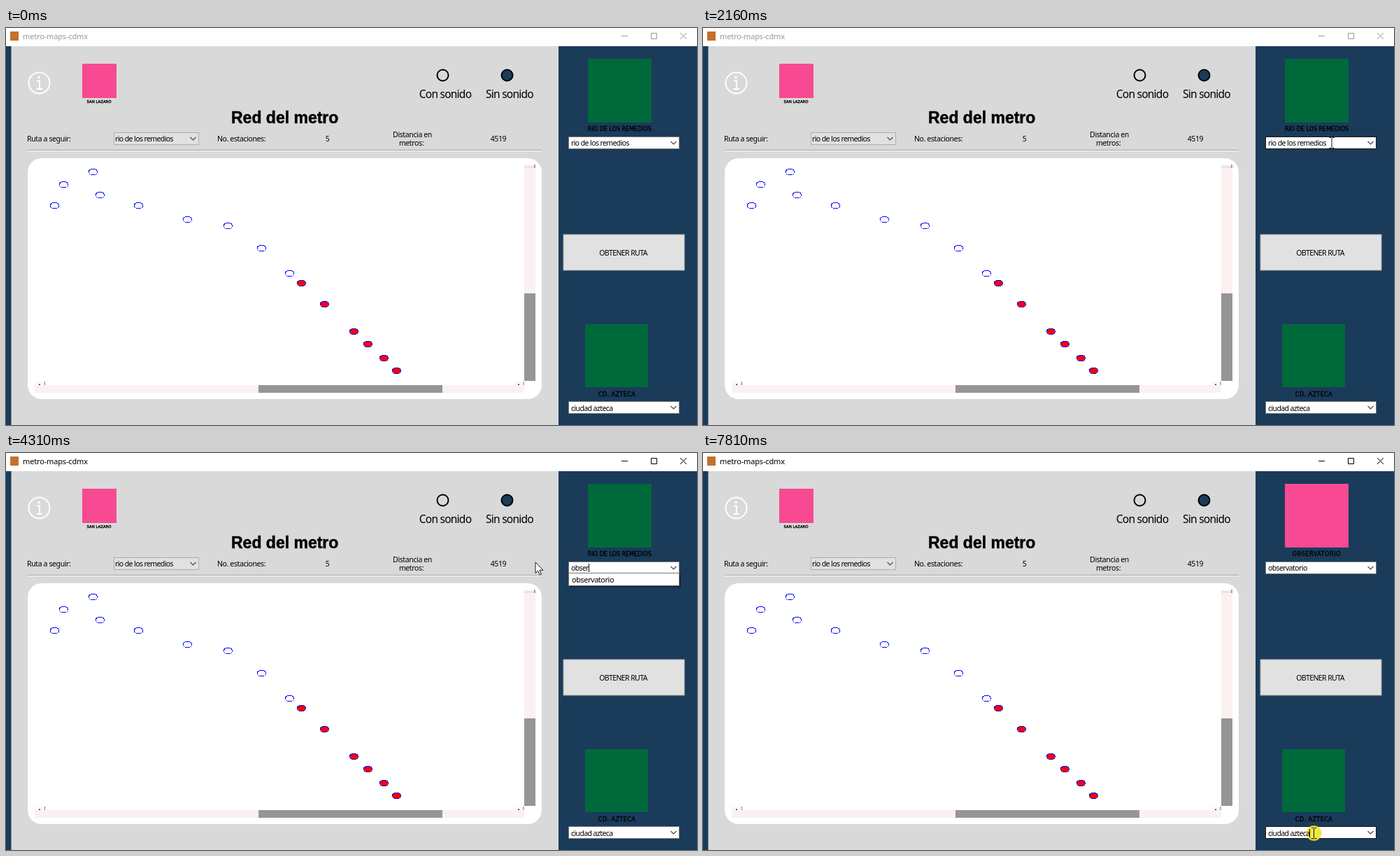
Recreate the animation shown at these times as an HTML page. Size 988 by 567 pixels, loop 8000 ms.

```html
<!DOCTYPE html>
<html lang="es">
<head>
<meta charset="utf-8">
<title>metro-maps-cdmx</title>
<style>
html, body { margin: 0; width: 100%; height: 100%; overflow: hidden; background: #fff; }
svg { display: block; width: 988px; height: 567px; }
text { font-family: "Noto Sans", sans-serif; white-space: pre; }
.label { font-size: 10.5px; letter-spacing: -.38px; }
.field { font-size: 10.5px; letter-spacing: -.6px; }
.item { font-size: 11px; letter-spacing: -.48px; }
.radio { font-size: 15.5px; letter-spacing: -.75px; }
.sign { font: 8px "DejaVu Sans", sans-serif; stroke: #000; stroke-width: .3px; text-anchor: middle; }
.title { font: bold 23px "Liberation Sans", Arial, sans-serif; stroke: #000; stroke-width: .5px; }
.mid { text-anchor: middle; }
</style>
</head>
<body>
<svg id="stage" viewBox="0 0 988 567"></svg>
<script>
const LOOP = 8000, BLUE = '#1a3b59', GRAY = '#d9d9d9', GREEN = '#00693c', PINK = '#f74a92';
const stage = document.getElementById('stage');

const rect = (x, y, w, h, fill, more = '') =>
  `<rect x="${x}" y="${y}" width="${w}" height="${h}" fill="${fill}" ${more}/>`;
const box = (x, y, w, h, fill, line, more = '') =>
  rect(x + .5, y + .5, w - 1, h - 1, fill, `stroke="${line}" ${more}`);
const text = (x, y, cls, s, more = '') => `<text x="${x}" y="${y}" class="${cls}" ${more}>${s}</text>`;
const path = (d, line, more = '') => `<path d="${d}" fill="none" stroke="${line}" ${more}/>`;
const chevron = (x, y) => path(`M${x - 4} ${y - 2}l4 4 4-4`, '#444', 'stroke-width="1.1"');
const radio = (x, fill) =>
  `<circle cx="${x}" cy="67.5" r="8" fill="${fill}" stroke="#000" stroke-width="2"/>`;
const station = (x, y, fill) =>
  box(x - 6, y - 4, 13, 9, fill, '#00f', 'rx="4" shape-rendering="crispEdges"');

const idle = [[124, 205], [82, 223], [134, 238], [69, 253], [189, 253], [259, 273],
  [317, 282], [365, 314], [405, 350]];
const route = [[422, 364], [455, 394], [497, 433], [517, 451], [540, 471], [558, 489]];

function buildStage() {
  return rect(0, 0, 988, 567, '#fff')
    + rect(0, 26, 988, 541, BLUE) + rect(7.5, 26, 782.5, 541, GRAY)
    // window bar
    + rect(6, 5, 12, 13, '#c4712b')
    + text(24, 16, 'item', 'metro-maps-cdmx', 'id="caption" style="letter-spacing:-.15px"')
    + path('M880 11.5h9M922.5 7.5h8v8h-8zM964 7l9 9M973 7l-9 9', '#999', 'id="controls"')
    // header
    + '<circle cx="47.5" cy="78.5" r="15" fill="none" stroke="#fff" stroke-width="2"/>'
    + path('M44 75.5h4v11M43.5 87h8.5', '#fff', 'stroke-width="1.8"')
    + '<circle cx="47" cy="70.5" r="1.8" fill="#fff"/>'
    + rect(109, 51, 49, 49, PINK)
    + text(133, 106.5, 'sign', 'SAN LAZARO', 'style="font-size:5.4px"')
    + radio(624.5, GRAY) + radio(716.5, BLUE)
    + text(628, 100, 'radio mid', 'Con sonido') + text(720, 100, 'radio mid', 'Sin sonido')
    + text(322, 135.5, 'title', 'Red del metro')
    + text(30, 162, 'label', 'Ruta a seguir:')
    + box(154, 149, 122, 18, '#e1e1e1', '#adadad')
    + text(156, 162, 'field', 'rio de los remedios') + chevron(267.5, 158)
    + text(302, 162, 'label', 'No. estaciones:') + text(459.5, 162, 'label mid', '5')
    + text(581, 156, 'label mid', 'Distancia en') + text(579.5, 168, 'label mid', 'metros:')
    + text(704, 162, 'label mid', '4519')
    + rect(31, 174, 735, 1, '#a0a0a0') + rect(31, 175, 735, 1, '#fff')
    // map
    + rect(31, 186, 735, 344, '#fff', 'rx="20"')
    + idle.map(p => station(...p, '#fff')).join('')
    + route.map(p => station(...p, '#f00')).join('')
    + rect(741, 195, 16, 309, '#fbf1f1') + rect(741, 379, 16, 125, '#969696')
    + rect(41, 510, 700, 11, '#fbf1f1') + rect(361, 510, 263, 11, '#969696')
    + rect(41, 505, 15, 5, '#fdf8f8') + rect(726, 505, 15, 5, '#fdf8f8')
    + rect(741, 198, 15, 1, '#d5cccc') + rect(755.5, 195, 1, 5, '#555')
    + rect(47, 508.5, 2, 1.5, '#333') + rect(55, 505, 1, 5, '#777')
    + rect(732, 508.5, 2, 1.5, '#333') + rect(739.5, 505, 1, 5, '#777')
    // side panel
    + rect(832, 44, 91, 91, GREEN, 'id="sign"')
    + text(877.5, 147, 'sign', '', 'id="signName"')
    + rect(828, 423, 90, 90, GREEN)
    + text(873.5, 525.5, 'sign', 'CD. AZTECA', 'style="letter-spacing:.45px"')
    + box(796.5, 294.5, 174, 52, '#e1e1e1', '#adadad', 'id="button"')
    + text(882.5, 325, 'label mid', 'OBTENER RUTA', 'style="letter-spacing:-.6px"')
    + box(804, 155, 159, 18, '#fff', '#7a7a7a', 'id="from"')
    + box(804, 533, 159, 18, '#fff', '#7a7a7a', 'id="to"')
    + '<g id="popup"></g>'
    + '<circle id="halo" r="11" fill="#ece42c" opacity=".85"/>'
    + text(808, 168, 'field', '', 'id="query"')
    + '<clipPath id="clip"><rect id="clipBox" y="157" height="14"/></clipPath>'
    + '<g id="chosen" clip-path="url(#clip)">' + rect(804, 157, 100, 14, '#0078d7')
    + text(808, 168, 'field', 'rio de los remedios', 'fill="#fff"') + '</g>'
    + text(808, 547, 'field', 'ciudad azteca', 'id="target"')
    + chevron(954.5, 164) + chevron(954.5, 542)
    + rect(0, 0, 1, 12, '#000', 'id="caret"')
    // pointer
    + '<path id="arrow" d="M0 0V15.6L3.6 12.2 6.1 17.8 8.4 16.8 6 11.3H11Z" fill="#fff" stroke="#000" stroke-width=".9"/>'
    + path('M-3.5-7.5H-1L0-6.5 1-7.5H3.5M0-6.5V6.5M-3.5 7.5H-1L0 6.5 1 7.5H3.5', '#111', 'id="beam"');
}
stage.innerHTML = buildStage();

const el = {};
stage.querySelectorAll('[id]').forEach(e => el[e.id] = e);
const set = (e, o) => { for (const k in o) e.setAttribute(k, o[k]); };
const show = (e, on) => set(e, { visibility: on ? 'visible' : 'hidden' });
const within = (t, a, b) => t >= a && t < b;

// time, x, y, moves since the previous stop
const stops = [
  [850, 914, 512, 1], [1210, 903, 345, 5], [1359, 903, 345, 1], [1360, 903, 328, 1],
  [1480, 901, 267, 2], [1760, 902, 196, 4], [2160, 899, 164, 6], [2230, 899, 164, 1],
  [2770, 757, 156, 7], [4850, 757, 156, 1], [5190, 795, 178, 5], [5590, 859, 183, 6],
  [6800, 859, 183, 1], [7600, 873.5, 543, 11]
];
function pointer(t) {
  const i = stops.findIndex(s => s[0] > t);
  if (i < 0) return stops[stops.length - 1].slice(1, 3);
  if (!i) return [-50, -50];
  const [t0, x0, y0] = stops[i - 1], [t1, x1, y1, n] = stops[i];
  const k = Math.floor((t - t0) / (t1 - t0) * n) / n;
  const e = n > 6 ? k * k * (3 - 2 * k) : k;
  return [x0 + (x1 - x0) * e, y0 + (y1 - y0) * e];
}

const typing = [[0, 'rio de los remedios'], [2910, ''], [3190, 'o'], [3450, 'ob'],
  [3710, 'obs'], [4240, 'obse'], [4310, 'obser'], [5730, 'observatorio']];
const names = ['oceania', 'observatorio', 'olimpica', 'olivos', 'obrera'];

function drawPopup(t, typed) {
  if (!within(t, 3190, 6130)) return '';
  const list = names.filter(n => n.startsWith(typed));
  const h = Math.round(5 + 13.8 * list.length), picked = t >= 5730;
  return (t >= 3250 ? rect(806, 173, 159, h, '#000', 'opacity=".3"') : '')
    + box(804, 171, 159, h, '#fff', '#777')
    + (picked ? rect(806, 173, 155, 15, '#0078d7') : '')
    + list.map((n, i) => text(809, 184.5 + 13.8 * i, 'item', n, picked ? 'fill="#fff"' : '')).join('');
}

let lastPopup = null;
function draw(t) {
  const [x, y] = pointer(t);
  const active = t >= 2230, arrived = t >= 6130, atEnd = t >= 7740;
  const drag = within(t, 2230, 2770);
  const overFrom = within(t, 1700, 2770) && y < 173 && x > 803;
  const overTo = t > 6800 && y > 533;

  set(el.caption, { fill: active ? '#000' : '#999' });
  set(el.controls, { stroke: active ? '#000' : '#999' });
  const hot = within(t, 1060, 1550);
  set(el.button, { fill: hot ? '#e5edf7' : '#e1e1e1', stroke: hot ? '#0078d7' : '#adadad' });
  set(el.from, { stroke: overFrom ? '#171717' : '#7a7a7a' });
  set(el.to, { stroke: overTo ? '#171717' : '#7a7a7a' });

  set(el.sign, { fill: arrived ? PINK : GREEN });
  el.signName.textContent = arrived ? 'OBSERVATORIO' : 'RIO DE LOS REMEDIOS';
  el.signName.style.letterSpacing = arrived ? '.6px' : '0px';

  const typed = typing.filter(s => s[0] <= t).pop()[1];
  el.query.textContent = typed;
  show(el.chosen, within(t, 2230, 2910));
  const left = Math.min(890, Math.max(807, x));
  set(el.clipBox, { x: left, width: 890 - left });

  const popup = drawPopup(t, typed);
  if (popup !== lastPopup) el.popup.innerHTML = lastPopup = popup;

  const blink = t < 5930 || within(t, 6460, 6990) || t >= 7520;
  const line = atEnd ? el.target : el.query;
  const width = line.textContent ? line.getComputedTextLength() : 0;
  set(el.caret, { x: Math.round(808 + width), y: atEnd ? 537 : 158 });
  show(el.caret, t >= 2910 && blink);

  const at = `translate(${x} ${y})`, beam = drag || overFrom || overTo;
  for (const k of ['halo', 'arrow', 'beam']) set(el[k], { transform: at });
  show(el.halo, drag || within(t, 5730, 6130) || atEnd);
  show(el.beam, beam);
  show(el.arrow, t >= 850 && !beam);
}

const start = performance.now();
function tick() {
  draw((performance.now() - start) % LOOP);
  requestAnimationFrame(tick);
}
tick();
</script>
</body>
</html>
```
